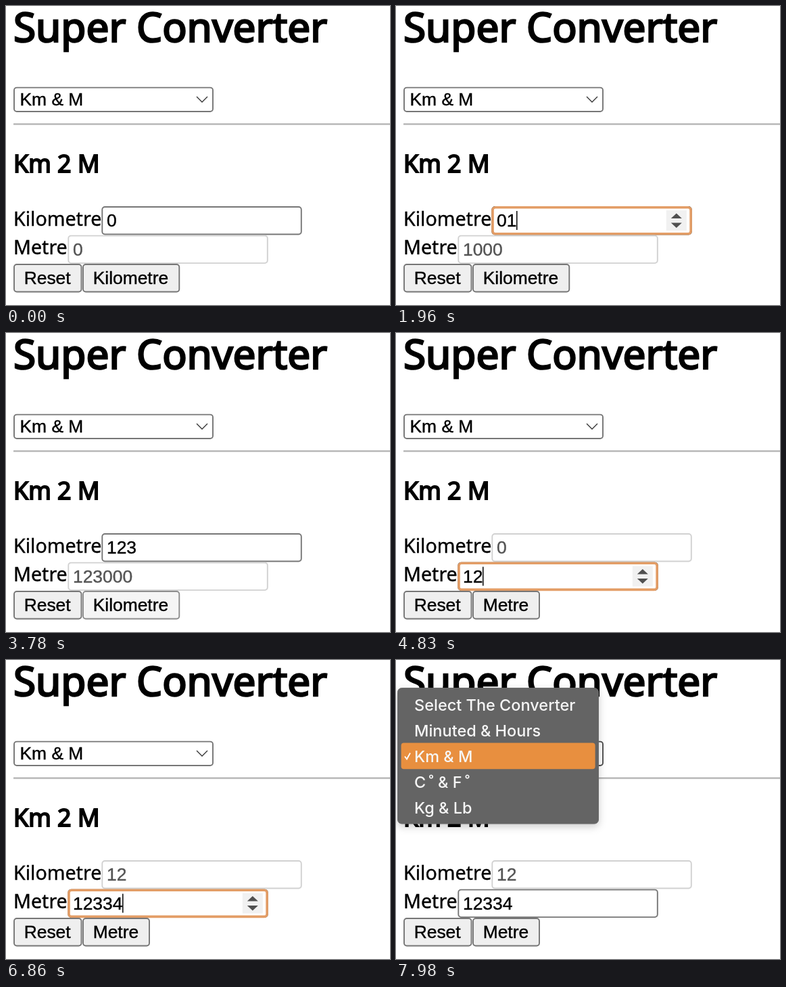
Animation of 568 by 442 pixels, one loop 8 s. Source, as an HTML page:

```html
<!DOCTYPE html>
<html lang="en">
<head>
<meta charset="utf-8">
<title>Super Converter</title>
<style>
  html, body { margin: 0; width: 100%; height: 100%; overflow: hidden; background: #fff; }
  svg { display: block; color: #000; font-family: "Liberation Sans", Arial, sans-serif; font-size: 26.4px; }
  text { white-space: pre; fill: currentColor; stroke: currentColor; stroke-width: .4px; }
  .page { font-family: "Noto Sans", sans-serif; font-size: 28.6px; }
  .page .title { font-size: 60.3px; stroke-width: 2.5px; }
  .page .section { font-size: 35.9px; stroke-width: 1.9px; }
  .menu { font-family: Inter, sans-serif; font-size: 23.5px; font-weight: 500; color: #f6f6f6; }
  .menu text { stroke: none; }
  .menu .panel { filter: drop-shadow(0 4px 6px rgba(0, 0, 0, .2)); }
</style>
</head>
<body>
<svg id="stage" width="568" height="442" viewBox="0 0 568 442"></svg>
<script>
const LOOP = 8000;
const DIGIT = 26.4 * 0.556;
const BORDER = { normal: '#767676', hover: '#4f4f4f', active: '#8d8d8d', disabled: '#d1d1d1' };
const FACE = { normal: '#efefef', hover: '#e5e5e5', active: '#f5f5f5' };
const OPTIONS = ['Select The Converter', 'Minuted & Hours', 'Km & M', 'C\u2009˚ & F\u2009˚', 'Kg & Lb'];

// Each step changes part of the interface state from its time on.
const STEPS = [
  [0, { amount: '0', flipped: false, hover: '', pressed: false, focus: false, ring: 0, caret: true, menu: false }],
  [770, { hover: 'km' }],
  [980, { focus: true, ring: 2 }],
  [1050, { ring: 0 }],
  [1470, { amount: '01' }],
  [2030, { amount: '1' }],
  [2240, { amount: '12' }],
  [2800, { amount: '123' }],
  [3290, { caret: false }],
  [3500, { hover: 'flip' }],
  [3780, { focus: false, pressed: true }],
  [3850, { amount: '0', flipped: true, pressed: false }],
  [4060, { hover: 'metre' }],
  [4270, { focus: true, ring: 2, caret: true }],
  [4340, { ring: 0 }],
  [4410, { amount: '' }],
  [4550, { amount: '1' }],
  [4830, { amount: '12' }],
  [4900, { hover: 'flip' }],
  [5110, { amount: '123' }],
  [5600, { caret: false }],
  [6090, { caret: true }],
  [6230, { amount: '1233' }],
  [6370, { hover: '' }],
  [6650, { amount: '12334' }],
  [7140, { caret: false, hover: 'flip' }],
  [7490, { hover: '' }],
  [7770, { hover: 'select' }],
  [7840, { focus: false }],
  [7980, { menu: true }]
];

const escapeText = s => s.replace(/&/g, '&amp;');
const text = (x, y, s, attrs = '') => `<text x="${x}" y="${y}" ${attrs}>${escapeText(s)}</text>`;
const rect = (x, y, w, h, r, attrs) =>
  `<rect x="${x}" y="${y}" width="${w}" height="${h}" rx="${r}" ${attrs}/>`;
const frame = (x, y, w, h, stroke, fill = '#fff') =>
  rect(x, y, w, h, 4, `fill="${fill}" stroke="${stroke}" stroke-width="1.9"`);

function spinner(x, y) {
  return rect(x - 15, y - 15, 30, 30, 0, 'fill="#f1f1f1"') +
    `<path d="M${x - 8} ${y - 3}l8-7.5 8 7.5zM${x - 8} ${y + 3.5}l8 7.5 8-7.5z" fill="#505050"/>`;
}

function field(name, x, y, value, enabled, s) {
  const focused = enabled && s.focus;
  const hovered = enabled && s.hover === name;
  const border = !enabled ? 'disabled' : hovered ? 'hover' : 'normal';
  let out = frame(x, y, 294.5, 40.5, BORDER[border]);
  if (focused) {
    const g = s.ring;
    out += rect(x + 0.7 - g, y + 0.7 - g, 293.1 + 2 * g, 39.1 + 2 * g, 4 + g,
      `fill="none" stroke="#e39d66" stroke-width="3.6" opacity="${g ? 0.6 : 1}"`);
  }
  if (focused || hovered) out += spinner(x + 272.5, y + 20);
  out += text(x + 6.7, y + 29.3, value, `color="${enabled ? '#000' : '#545454'}"`);
  if (focused && s.caret) {
    out += rect(x + 6.3 + value.length * DIGIT, y + 6, 1.6, 28, 0, 'fill="#111"');
  }
  return out;
}

function button(x, w, label, look) {
  return frame(x, 382, w, 40.5, BORDER[look], FACE[look]) + text(x + 14.7, 411, label);
}

function menu() {
  const items = OPTIONS.map((label, i) => text(27, 74.5 + 38 * i, label)).join('');
  return '<g class="menu">' +
    rect(2.5, 41.5, 297, 200.5, 6, 'class="panel" fill="#646464" stroke="#6a6a6a"') +
    rect(7.6, 122.6, 287, 38.6, 4, 'fill="#e88f3f"') +
    '<path d="M13 142.5l3 4 5-9" fill="none" stroke="#fff" stroke-width="1.8"/>' +
    items + '</g>';
}

function render(s) {
  const n = Number(s.amount);
  const km = s.flipped ? String(Math.floor(n / 1000)) : s.amount;
  const metre = s.flipped ? s.amount : String(n * 1000);
  const flipLook = s.hover !== 'flip' ? 'normal' : s.pressed ? 'active' : 'hover';
  return rect(0, 0, 568, 442, 0, 'fill="#fff"') +
    '<g class="page">' +
    text(11, 53, 'Super Converter', 'class="title"') +
    text(11, 245.5, 'Km 2 M', 'class="section"') +
    text(11, 324.6, 'Kilometre') +
    text(11, 367, 'Metre') + '</g>' +
    frame(12, 120.6, 294, 35.4, BORDER[s.hover === 'select' ? 'hover' : 'normal']) +
    text(20.5, 146.8, 'Km & M') +
    '<path d="M282 134l8 8 8-8" fill="none" stroke="#333" stroke-width="1.3"/>' +
    rect(11, 173.8, 557, 1.6, 0, 'fill="#929292"') +
    rect(11, 175.4, 557, 1.4, 0, 'fill="#eee"') +
    field('km', 142.3, 297, km, !s.flipped, s) +
    field('metre', 92.3, 339.6, metre, s.flipped, s) +
    button(12, 99.5, 'Reset', 'normal') +
    button(114, s.flipped ? 98 : 142.3, s.flipped ? 'Metre' : 'Kilometre', flipLook) +
    (s.menu ? menu() : '');
}

const stage = document.getElementById('stage');
const start = performance.now();
let shown = -1;

function tick() {
  const t = (performance.now() - start) % LOOP;
  const past = STEPS.filter(([at]) => at <= t);
  if (past.length !== shown) {
    shown = past.length;
    stage.innerHTML = render(Object.assign({}, ...past.map(([, change]) => change)));
  }
  requestAnimationFrame(tick);
}
tick();
</script>
</body>
</html>
```
